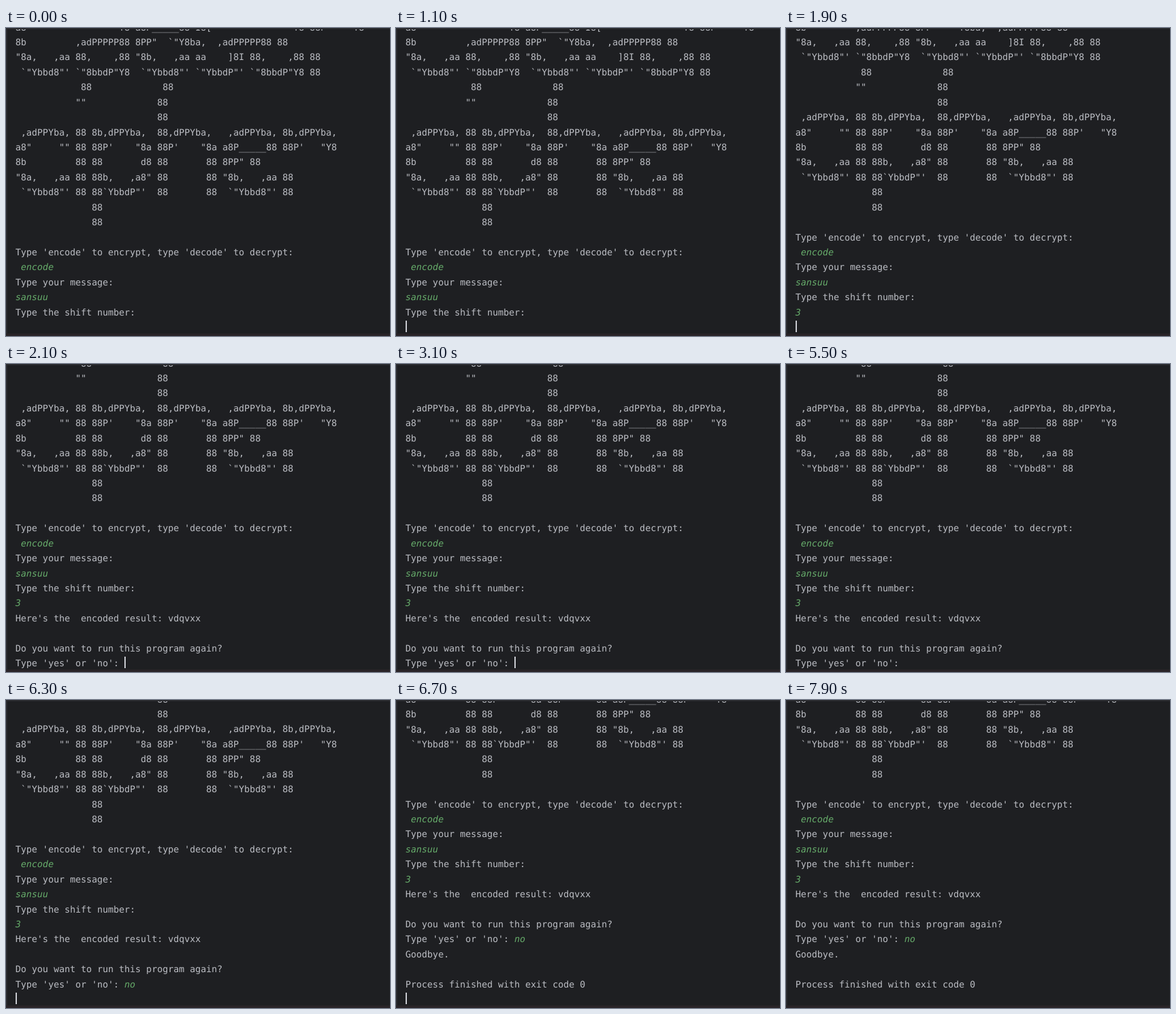
Animation, 600 px wide and 481 px high, one loop 8000 ms. Source, as an HTML page:

```html
<!DOCTYPE html>
<html lang="en">
<head>
<meta charset="utf-8">
<title>Caesar cipher console</title>
<style>
  :root { --row: 23.417px; --col: 8.52px; --top: -11.4px; }
  html, body { margin: 0; width: 100%; height: 100%; overflow: hidden; background: #1e1f22; }
  .stage { position: relative; width: 600px; height: 481px; overflow: hidden; background: #1e1f22; }
  .view { position: absolute; inset: 2px 0 4px 0; overflow: hidden; }
  .edge { position: absolute; background: #2a2b2f; }
  .edge.t { left: 0; top: 0; width: 600px; height: 2px; }
  .edge.l { left: 0; top: 0; width: 2px; height: 481px; }
  .edge.b { left: 0; top: 477px; width: 600px; height: 4px; background: #292428; }

  pre {
    position: absolute; left: 14.8px; top: calc(var(--top) - 2px); margin: 0;
    font: 14.15px "DejaVu Sans Mono", "Noto Sans Mono", monospace;
    line-height: var(--row); color: #bcbec4;
    text-rendering: geometricPrecision; font-variant-ligatures: none;
    animation: scroll 8s step-end infinite;
  }
  i { color: #67ad6b; }
  .shift, .result, .n, .o, .bye { animation: 8s step-end infinite; }
  .shift { animation-name: shift; }
  .result { animation-name: result; }
  .n { animation-name: n; }
  .o { animation-name: o; }
  .bye { animation-name: bye; }

  /* rows are counted from the first, half-hidden line */
  .caret {
    --x: 0; --y: 20;
    position: absolute; width: 2px; height: 18px; background: #ced0d6;
    left: calc(var(--x) * var(--col) + .2px);
    top: calc(var(--y) * var(--row) + .1px);
    animation: caret 8s step-end infinite;
  }

  @keyframes scroll {
    0%     { margin-top: 0; }
    23.75% { margin-top: calc(var(--row) * -1); }
    25%    { margin-top: calc(var(--row) * -4); }
    78.75% { margin-top: calc(var(--row) * -5); }
    80%, 100% { margin-top: calc(var(--row) * -8); }
  }
  @keyframes shift  { 0% { opacity: 0; } 18.75%, 100% { opacity: 1; } }
  @keyframes result { 0% { opacity: 0; } 25%, 100% { opacity: 1; } }
  @keyframes n      { 0% { opacity: 0; } 71.25%, 100% { opacity: 1; } }
  @keyframes o      { 0% { opacity: 0; } 73.75%, 100% { opacity: 1; } }
  @keyframes bye    { 0% { opacity: 0; } 80%, 100% { opacity: 1; } }
  @keyframes caret {
    0%     { --x: 0;  --y: 20; opacity: 0; }
    6.25%  { --x: 0;  --y: 20; opacity: 1; }
    18.75% { --x: 1;  --y: 20; opacity: 1; }
    23.75% { --x: 0;  --y: 21; opacity: 1; }
    25%    { --x: 20; --y: 24; opacity: 1; }
    66.25% { --x: 20; --y: 24; opacity: 0; }
    71.25% { --x: 21; --y: 24; opacity: 1; }
    73.75% { --x: 22; --y: 24; opacity: 1; }
    78.75% { --x: 0;  --y: 25; opacity: 1; }
    80%    { --x: 0;  --y: 28; opacity: 1; }
    93.75%, 100% { --x: 0; --y: 28; opacity: 0; }
  }
  @property --x { syntax: "<number>"; inherits: false; initial-value: 0; }
  @property --y { syntax: "<number>"; inherits: false; initial-value: 20; }
</style>
</head>
<body>
<div class="stage">
<div class="edge t"></div><div class="edge l"></div><div class="edge b"></div>
<div class="view"><pre>
a8"     "" ""     `Y8 a8P_____88 I8[    "" ""     `Y8 88P'   "Y8
8b         ,adPPPPP88 8PP"  `"Y8ba,  ,adPPPPP88 88
"8a,   ,aa 88,    ,88 "8b,   ,aa aa    ]8I 88,    ,88 88
 `"Ybbd8"' `"8bbdP"Y8  `"Ybbd8"' `"YbbdP"' `"8bbdP"Y8 88
            88             88
           ""             88
                          88
 ,adPPYba, 88 8b,dPPYba,  88,dPPYba,   ,adPPYba, 8b,dPPYba,
a8"     "" 88 88P'    "8a 88P'    "8a a8P_____88 88P'   "Y8
8b         88 88       d8 88       88 8PP" 88
"8a,   ,aa 88 88b,   ,a8" 88       88 "8b,   ,aa 88
 `"Ybbd8"' 88 88`YbbdP"'  88       88  `"Ybbd8"' 88
              88
              88

Type 'encode' to encrypt, type 'decode' to decrypt:
<i> encode</i>
Type your message:
<i>sansuu</i>
Type the shift number:
<i class="shift">3</i>
<span class="result">Here's the  encoded result: vdqvxx

Do you want to run this program again?
Type 'yes' or 'no': </span><i class="n">n</i><i class="o">o</i>
<span class="bye">Goodbye.

Process finished with exit code 0</span>
<span class="caret"></span></pre></div>
</div>
</body>
</html>
```
